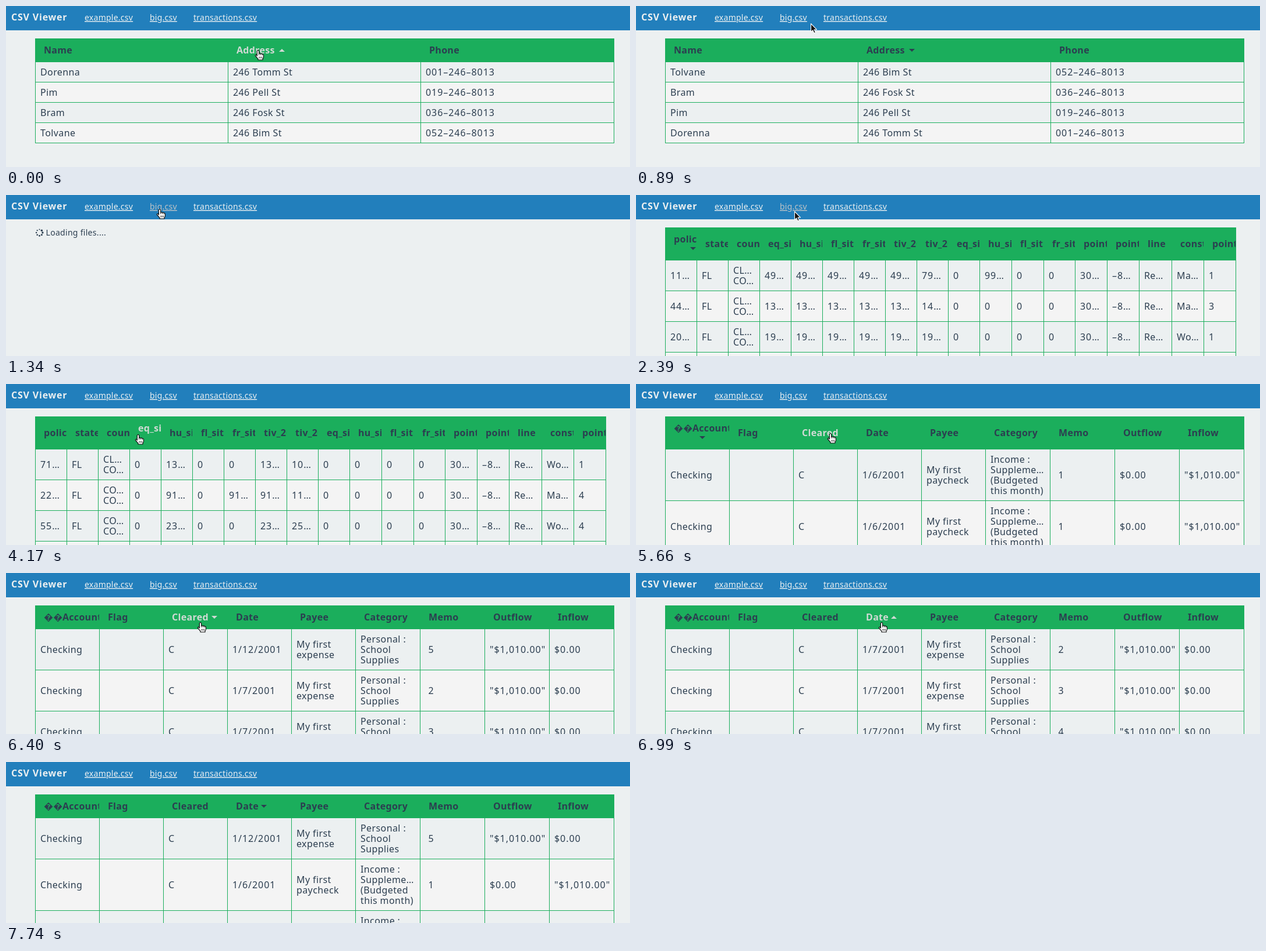
These frames come from a looping animation (1072 by 278 pixels, 8460 ms). An HTML page:

```html
<!DOCTYPE html>
<html lang="en">
<head>
<meta charset="utf-8">
<title>CSV Viewer</title>
<style>
  html, body { margin: 0; width: 100%; height: 100%; overflow: hidden; background: #ecf0f1; }
  #stage { display: block; width: 1072px; height: 278px; }
  text { font: 16px "Noto Sans", sans-serif; letter-spacing: .4px; fill: #2c3e50; white-space: pre; }
  .num { letter-spacing: .95px; }
  .head { font-weight: 700; letter-spacing: .3px; }
  .brand { font-weight: 700; letter-spacing: .8px; fill: #ecf0f1; }
  .link { font-size: 14px; letter-spacing: .25px; fill: #ecf0f1; text-decoration: underline; }
  .note { font-size: 14px; letter-spacing: .3px; }
  .link.hot { fill: #bdc3c7; }
  .head.hot, polygon.hot { fill: #d0dad4; }
  polygon { fill: #2c3e50; }
  rect { shape-rendering: crispEdges; }
</style>
</head>
<body>
<svg id="stage" viewBox="0 0 1072 278">
  <rect width="1072" height="278" fill="#ecf0f1"/>
  <rect width="1072" height="42" fill="#227fbc"/>
  <text class="brand" x="9" y="25">CSV Viewer</text>
  <g id="links"></g>
  <g id="page"></g>
  <g id="cursor"></g>
</svg>
<script>
const LOOP = 8460, GREEN = '#1bae5c', TOP = 56, LINE = 18;
const $ = id => document.getElementById(id);
const split = s => s.split('|');

const links = [
  { x: 135, end: 219, name: 'example.csv' },
  { x: 247, end: 294, name: 'big.csv' },
  { x: 322, end: 432, name: 'transactions.csv' }
];

// Columns: left edges plus the final right edge
const people = { cols: [50, 381, 712, 1044], heads: ['Name', 'Address', 'Phone'] };
const big = {
  cols: [50, 104, 158, 212, 266, 320, 374, 428, 482, 536, 590, 645, 700, 754, 809, 864, 920, 975, 1030],
  heads: split('policyID|statecode|county|eq_site_limit|hu_site_limit|fl_site_limit|fr_site_limit|tiv_2011|tiv_2012|' +
    'eq_site_deductible|hu_site_deductible|fl_site_deductible|fr_site_deductible|' +
    'point_latitude|point_longitude|line|construction|point_granularity')
};
const money = {
  cols: [50, 160, 270, 380, 490, 600, 711, 822, 933, 1044],
  heads: split('\uFFFD\uFFFD<tspan x="47">Account</tspan>|Flag|Cleared|Date|Payee|Category|Memo|Outflow|Inflow')
};

const contacts = [
  'Dorenna|246 Tomm St|001–246–8013',
  'Pim|246 Pell St|019–246–8013',
  'Bram|246 Fosk St|036–246–8013',
  'Tolvane|246 Bim St|052–246–8013'
];
const tail = (build, n) => `0|0|0|0|30…|–8…|Re…|${build}…|${n}`;
const policy = (id, county, limits, build, n) =>
  `${id}…|FL|${county}…~CO…|${limits}|${tail(build, n)}`;
const income = 'Checking||C|1/6/2001|My first~paycheck|Income :~Suppleme…~(Budgeted~this month)|1|$0.00|"$1,010.00"';
const expense = (day, memo) =>
  `Checking||C|1/${day}/2001|My first~expense|Personal :~School~Supplies|${memo}|"$1,010.00"|$0.00`;

// sort: [column, direction, arrow centre]
const views = {
  peopleDesc: { table: people, sort: [1, 'up', 474], rows: contacts },
  peopleAsc: { table: people, sort: [1, 'down', 474], rows: [...contacts].reverse() },
  bigStart: { table: big, tall: true, sort: [0, 'down', 98], rows: [
    policy('11', 'CL', '49…|49…|49…|49…|49…|79…', 'Ma', 1).replace('79…|0|0', '79…|0|99…'),
    policy('44', 'CL', '13…|13…|13…|13…|13…|14…', 'Ma', 3),
    policy('20', 'CL', '19…|19…|19…|19…|19…|19…', 'Wo', 1),
    policy('33', 'CL', '79…|79…|79…|79…|79…|85…', 'Wo', 3)] },
  bigDesc: { table: big, tall: true, sort: [3, 'up', 281], rows: [
    policy('75', 'CO', '96…|96…|96…|96…|96…|12…', 'Ma', 4),
    policy('39', 'CL', '95…|95…|0|0|95…|11…', 'Wo', 1),
    policy('64', 'CO', '92…|92…|92…|92…|92…|10…', 'Ma', 3),
    policy('18', 'CO', '90…|90…|0|0|90…|99…', 'Wo', 1)] },
  bigAsc: { table: big, tall: true, sort: [3, 'down', 281], rows: [
    policy('71', 'CL', '0|13…|0|0|13…|10…', 'Wo', 1),
    policy('22', 'CO', '0|91…|0|91…|91…|11…', 'Ma', 4),
    policy('55', 'CO', '0|23…|0|0|23…|25…', 'Wo', 4),
    policy('61', 'CO', '0|18…|0|0|18…|20…', 'Wo', 1)] },
  moneyStart: { table: money, tall: true, sort: [0, 'down', 114], rows: [income, income] },
  clearedDesc: { table: money, sort: [2, 'up', 358], rows: [income, income, expense(7, 3)] },
  clearedAsc: { table: money, sort: [2, 'down', 358], rows: [expense(12, 5), expense(7, 2), expense(7, 3)] },
  dateDesc: { table: money, sort: [3, 'up', 443], rows: [expense(7, 2), expense(7, 3), expense(7, 4)] },
  dateAsc: { table: money, sort: [3, 'down', 443], rows: [expense(12, 5), income, income] }
};

// [start ms, view, pointer x, pointer y, force arrow]
const steps = [
  [0, 'peopleDesc', 433, 76],
  [450, 'peopleAsc', 433, 76],
  [600, 'peopleAsc', 422, 70],
  [750, 'peopleAsc', 366, 45],
  [890, 'peopleAsc', 300, 30],
  [1040, 'peopleAsc', 264, 24],
  [1340, 'loading', 264, 24],
  [2390, 'bigStart', 272, 28, true],
  [2540, 'bigStart', 270, 34],
  [2690, 'bigStart', 261, 49],
  [2830, 'bigStart', 246, 70],
  [2980, 'bigStart', 233, 83],
  [3130, 'bigStart', 227, 87],
  [3580, 'bigDesc', 227, 87],
  [4170, 'bigAsc', 227, 87],
  [4320, 'bigAsc', 240, 76],
  [4470, 'bigAsc', 292, 50],
  [4620, 'bigAsc', 348, 30],
  [4760, 'bigAsc', 370, 23],
  [4910, 'moneyStart', 370, 23],
  [5210, 'moneyStart', 368, 32],
  [5360, 'moneyStart', 357, 52],
  [5510, 'moneyStart', 342, 75],
  [5660, 'moneyStart', 334, 85],
  [5950, 'clearedDesc', 334, 85],
  [6400, 'clearedAsc', 334, 85],
  [6550, 'clearedAsc', 348, 85],
  [6700, 'clearedAsc', 388, 85],
  [6840, 'clearedAsc', 418, 85],
  [6990, 'dateDesc', 422, 85],
  [7440, 'dateAsc', 422, 85],
  [7740, 'dateAsc']
];

const rect = (x, y, w, h, fill) => `<rect x="${x}" y="${y}" width="${w}" height="${h}" fill="${fill}"/>`;
const text = (x, y, cls, s) => `<text x="${x}" y="${y}" class="${cls}">${s}</text>`;

function sortArrow(cx, cy, dir, cls) {
  const d = dir === 'up' ? 2.5 : -2.5;
  return `<polygon class="${cls}" points="${cx - 5},${cy + d} ${cx + 5},${cy + d} ${cx},${cy - d}"/>`;
}

function headRow({ table, tall, sort }, hot) {
  const { cols, heads } = table, height = tall ? 57 : 41;
  let out = rect(cols[0], TOP, cols.at(-1) - cols[0] + 1, height, GREEN);
  heads.forEach((name, i) => {
    const x = cols[i], cls = i === hot ? 'hot' : '', sorted = i === sort[0];
    out += `<svg x="${x}" y="${TOP}" width="${cols[i + 1] - x}" height="${height}">` +
      text(15, tall && !sorted ? 34 : 26, 'head ' + cls, name) +
      (sorted ? sortArrow(sort[2] - x, tall ? 36.5 : 20.5, sort[1], cls) : '') + '</svg>';
  });
  return out;
}

function bodyRow(table, row, top, odd) {
  const { cols } = table, left = cols[0], width = cols.at(-1) - left + 1;
  const cells = split(row).map(c => c.split('~'));
  const most = cells.reduce((n, c) => c.length > n ? c.length : n, 1);
  const height = LINE * most + 17;
  let out = rect(left, top + 1, width, height, odd ? '#f4f4f4' : '#ecf0f1');
  cells.forEach((lines, i) => {
    const pad = table.heads[i] === 'Memo' ? 14.5 : 9;
    const first = top + (height + 1) / 2 - lines.length * LINE / 2 + 15;
    lines.forEach((s, k) => {
      out += text(cols[i] + pad, first + k * LINE, /^[–"$\d\/.,…]+$/.test(s) ? 'num' : '', s);
    });
  });
  cols.forEach(x => out += rect(x, top, 1, height, GREEN));
  return { height, svg: out + rect(left, top + height, width, 1, GREEN) };
}

function tableSvg(view, hot) {
  let top = view.tall ? 112 : 96, out = headRow(view, hot);
  view.rows.forEach((row, i) => {
    const r = bodyRow(view.table, row, top, i % 2);
    out += r.svg;
    top += r.height;
  });
  return out;
}

function loadingSvg() {
  let out = text(68.5, 70, 'note', 'Loading files....');
  for (let i = 0; i < 8; i++) {
    const a = (i - 1) * Math.PI / 4;
    out += `<circle cx="${57.5 + 5.4 * Math.cos(a)}" cy="${65 + 5.4 * Math.sin(a)}" r="${1.75 - i * .11}" fill="#2c3e50"/>`;
  }
  return out;
}

const hand = `<path fill="#fff" stroke="#111" stroke-width="1.2" stroke-linejoin="round"
  d="M-1.6 10V1.7Q0-.8 1.6 1.7V6.2Q3.1 4.8 4.4 6.6Q6 5.4 7.2 7.2Q9.4 6.6 9.4 9V12Q9 14 8 15V17H0V15.4L-4.6 10Q-4.6 7.6-2.8 8.6Z"/>
  <path stroke="#111" stroke-width=".9" fill="none" d="M1.6 6V9M4.4 6.8V9M7.2 7.4V9.4M2 11.5V14.5M4.2 11.5V14.5M6.4 11.5V14.5"/>`;
const arrow = `<path fill="#111" stroke="#fff" stroke-width="1.1" stroke-linejoin="round"
  d="M.5.5V14.8L3.7 11.8L5.9 16.8L8.4 15.7L6.2 10.8H10.6Z"/>`;

function show([, name, x, y, plain]) {
  const view = views[name];
  const link = links.findIndex(l => y >= 12 && y <= 28 && x >= l.x && x <= l.end);
  const inHead = view && y >= TOP && y <= (view.tall ? 112 : 96);
  const hot = inHead ? view.table.heads.findIndex((_, i) => x >= view.table.cols[i] && x < view.table.cols[i + 1]) : -1;
  const onTarget = link >= 0 || hot >= 0;
  $('links').innerHTML = links.map((l, i) => text(l.x, 25, i === link ? 'link hot' : 'link', l.name)).join('');
  $('page').innerHTML = view ? tableSvg(view, hot) : loadingSvg();
  $('cursor').innerHTML = x === undefined ? '' :
    `<g transform="translate(${x} ${y})">${onTarget && !plain ? hand : arrow}</g>`;
}

let shown;
const start = performance.now();
function tick() {
  const t = (performance.now() - start) % LOOP;
  const step = steps.findLast(s => s[0] <= t);
  if (step !== shown) show(shown = step);
  requestAnimationFrame(tick);
}
tick();
</script>
</body>
</html>
```
